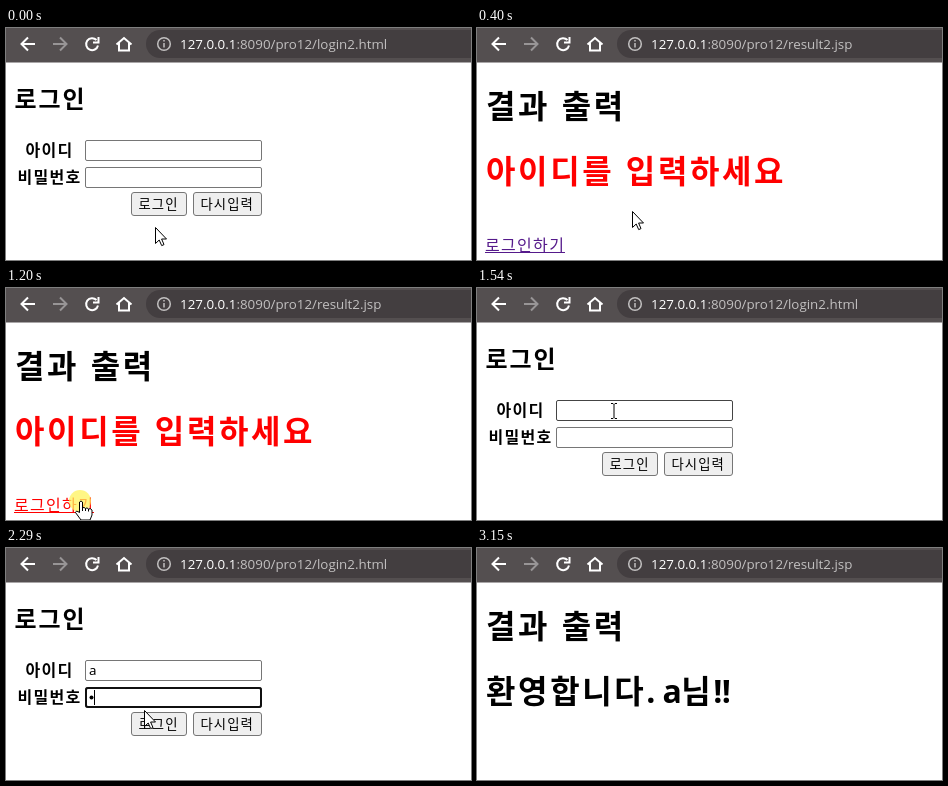
Animation of 465 by 232 pixels, one loop 3220 ms. Source, as an HTML page:

```html
<!DOCTYPE html>
<html lang="ko">
<head>
<meta charset="utf-8">
<title>로그인</title>
<style>
html, body { margin: 0; width: 100%; height: 100%; overflow: hidden; background: #fff; }
svg { display: block; width: 465px; height: 232px; }
text { font-family: "Noto Sans CJK KR", "Noto Sans CJK", sans-serif; letter-spacing: .082em; white-space: pre; }
.h1 { font-size: 32px; font-weight: 700; }
.h2 { font-size: 24px; font-weight: 700; }
.label { font-size: 16px; font-weight: 700; }
.small { font-size: 13.33px; }
.latin { font-family: "Noto Sans", sans-serif; letter-spacing: -.02em; }
.url { font: 13.35px "Open Sans", "Noto Sans", sans-serif; letter-spacing: 0; fill: #c2c0c0; }
.field { fill: #fff; stroke: #767676; }
.button { fill: #efefef; stroke: #767676; }
.icon { fill: none; stroke: #fff; stroke-width: 2; }
.pointer { fill: #fff; stroke: #000; stroke-linejoin: round; }
</style>
</head>
<body>
<svg viewBox="0 0 465 232">
  <rect width="465" height="232" fill="#fff"/>
  <rect width="465" height="34.5" fill="#544f50"/>
  <rect x="140" y="2" width="360" height="28" rx="14" fill="#433e40"/>
  <g class="icon">
    <path d="M29 16H16M22 9.5L15.5 16L22 22.5"/>
    <path d="M47 16H60M54 9.5L60.5 16L54 22.5" stroke="#989596"/>
    <path d="M90.5 12A6 6 0 1 0 92 17.5M92.5 9V14.5H87"/>
    <path d="M110.5 16.5L118 10L125.5 16.5M113 15V22.5H123V15"/>
    <g stroke="#c2c0c0" stroke-width="1.5"><circle cx="158" cy="16" r="6.3"/><path d="M158 15V19.5M158 12V13.5"/></g>
  </g>
  <text class="url" x="174" y="21"><tspan fill="#fff">127.0.0.1</tspan>:8090/pro12/<tspan id="file"></tspan></text>

  <g id="login">
    <text class="h2" x="8.5" y="80">로그인</text>
    <text class="label" x="19.5" y="128">아이디</text>
    <text class="label" x="11.5" y="155">비밀번호</text>
    <rect id="userField" class="field" x="79.5" y="112.5" width="176" height="20" rx="1.5"/>
    <rect id="passField" class="field" x="79.5" y="139.5" width="176" height="20" rx="1.5"/>
    <rect id="focusRing" x="80" y="113" width="175" height="19" rx="2" fill="none" stroke="#101010" stroke-width="2"/>
    <text id="userText" class="small latin" x="83" y="127">a</text>
    <circle id="passDot" cx="85.5" cy="149.5" r="2"/>
    <path id="caret" d="M0 0V15" stroke="#000"/>
    <rect id="submit" class="button" x="125.5" y="164.5" width="55" height="23" rx="2.5"/>
    <rect class="button" x="187.5" y="164.5" width="68" height="23" rx="2.5"/>
    <text class="small" x="132.5" y="181">로그인</text>
    <text class="small" x="194.5" y="181">다시입력</text>
  </g>

  <g id="result">
    <text class="h1" x="9" y="90">결과 출력</text>
    <text id="error" class="h1" x="9" y="155" fill="#f00">아이디를 입력하세요</text>
    <text id="welcome" class="h1" x="9" y="155">환영합니다<tspan class="latin">. a</tspan>님<tspan class="latin">!!</tspan></text>
    <g id="link">
      <text x="8" y="222.5" font-size="16">로그인하기</text>
      <rect x="8" y="224" width="80" height="1"/>
    </g>
  </g>

  <g id="cursor">
    <circle id="press" r="11" fill="#fff35c" fill-opacity=".75"/>
    <path id="arrow" class="pointer" d="M.5 .5V16.5L4.2 13L6.7 18.6L9 17.6L6.6 12H11.5Z"/>
    <path id="hand" class="pointer" d="M-.5 1Q1 -1 2.5 1V7Q4 5.5 5.5 7.5Q7 6 8.5 8Q10.5 7 12 9V14L10 19H1L-4.5 11.5Q-4 9 -.5 11.5ZM2.5 7V10M5.5 7.5V10M8.5 8V10.5"/>
    <path id="beam" d="M-3 -7.5H-1L0 -6.5L1 -7.5H3M0 -6.5V6.5M-3 7.5H-1L0 6.5L1 7.5H3" fill="none" stroke="#000"/>
  </g>
</svg>
<script>
const LOOP = 3220, TICKS = 48;
const el = id => document.getElementById(id);
const show = (id, on) => el(id).style.display = on ? "" : "none";
const within = (n, from, to) => n >= from && n < to;

// Pointer stops: tick, x, y
const stops = [
  [0, 149, 199], [3, 155, 183], [11, 155, 183], [17, 74, 213], [20, 74, 213],
  [23, 137, 123], [27, 137, 123], [34, 138, 162], [35, 138, 172], [48, 138, 172]
];

function pointerAt(n) {
  const i = stops.findIndex(s => s[0] > n);
  const [t0, x0, y0] = stops[i - 1], [t1, x1, y1] = stops[i];
  const p = (n - t0) / (t1 - t0), e = p * p * (3 - 2 * p);
  return [Math.round(x0 + (x1 - x0) * e), Math.round(y0 + (y1 - y0) * e)];
}

function draw(n) {
  const failed = within(n, 5, 20), welcomed = n >= 39, login = !failed && !welcomed;
  const [x, y] = pointerAt(n);
  const over = (left, top, right, bottom) => x >= left && x < right && y >= top && y < bottom;
  const overUser = login && over(79, 112, 256, 133);
  const overPass = login && over(79, 139, 256, 160);
  const overLink = failed && over(8, 207, 88, 227);
  const overSubmit = login && over(125, 164, 181, 188);

  show("login", login);
  show("result", !login);
  show("error", failed);
  show("link", failed);
  show("welcome", welcomed);
  el("file").textContent = login ? "login2.html" : "result2.jsp";
  el("link").setAttribute("fill", within(n, 17, 20) ? "#f00" : "#551a8b");

  const passFocused = n >= 30, focused = login && n >= 24;
  show("focusRing", focused);
  show("caret", focused);
  show("userText", n >= 28);
  show("passDot", n >= 32);
  el("focusRing").setAttribute("y", passFocused ? 140 : 113);
  const caretX = passFocused ? (n >= 32 ? 88.5 : 83.5) : (n >= 28 ? 90.5 : 83.5);
  el("caret").setAttribute("transform", `translate(${caretX} ${passFocused ? 142 : 115})`);
  el("userField").style.stroke = overUser ? "#444" : "";
  el("passField").style.stroke = overPass ? "#444" : "";
  el("submit").style.fill = overSubmit ? "#e5e5e5" : "";

  show("cursor", n < 47);
  show("hand", overLink);
  show("beam", overUser || overPass);
  show("arrow", !overLink && !overUser && !overPass);
  show("press", within(n, 3, 5) || within(n, 17, 19) || within(n, 24, 26) || within(n, 36, 38));
  el("cursor").setAttribute("transform", `translate(${x} ${y})`);
}

function frame() {
  const t = performance.now() % LOOP;
  draw(Math.floor((t + 8) * TICKS / LOOP) % TICKS);
  requestAnimationFrame(frame);
}
frame();
</script>
</body>
</html>
```
